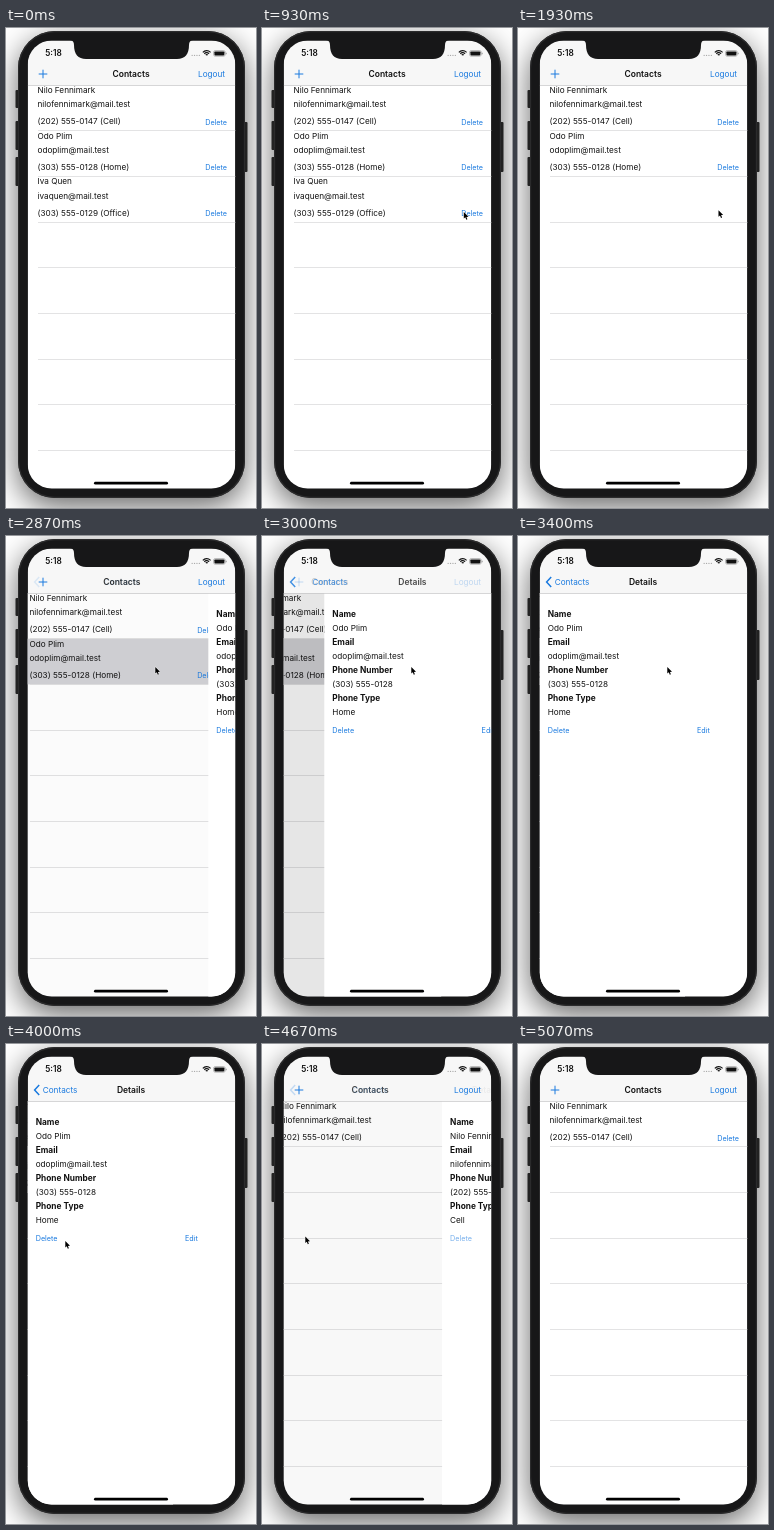
An HTML page with a canvas for the animation above (5.54 s loop, 250 by 480 pixels).

```html
<!DOCTYPE html>
<html lang="en">
<head>
<meta charset="utf-8">
<title>Contacts</title>
<style>
html, body { margin: 0; width: 100%; height: 100%; overflow: hidden; background: #fff; }
canvas { display: block; width: 250px; height: 480px; }
</style>
</head>
<body>
<canvas id="stage"></canvas>
<script>
const W = 250, H = 480, LOOP = 5540, TICK = 1000 / 15;
const BLUE = '#1a7adf', INK = '#111';
const SCREEN = { x: 21.7, y: 12.5, w: 207.6, h: 448, r: 24 };
const NAV_BOTTOM = 57, ROW = 45.7;
const canvas = document.getElementById('stage');
const ctx = canvas.getContext('2d');
const dpr = window.devicePixelRatio || 1;
canvas.width = W * dpr;
canvas.height = H * dpr;

const contacts = [
  { name: 'Nilo Fennimark', email: 'nilofennimark@mail.test', phone: '(202) 555-0147', type: 'Cell' },
  { name: 'Odo Plim', email: 'odoplim@mail.test', phone: '(303) 555-0128', type: 'Home' },
  { name: 'Iva Quen', email: 'ivaquen@mail.test', phone: '(303) 555-0129', type: 'Office' }
];

// Pointer path: tick, x, y
const pointerPath = [
  [7, 231, 182.5], [9, 208, 184], [11, 190.5, 185], [14, 201.5, 184], [18, 202, 184],
  [28, 202, 184], [37, 149, 131], [51, 149, 131], [60, 59, 197], [63, 43, 192.5], [76, 43, 192.5]
];

const clamp = v => Math.max(0, Math.min(1, v));
const smooth = v => v * v * (3 - 2 * v);

// Critically damped spring: share of the distance still to travel
function springLeft(ms) {
  if (ms <= 0) return 1;
  const k = ms * 0.018;
  return Math.exp(-k) * (1 + k);
}

function box(x, y, w, h, r, fill) {
  ctx.beginPath();
  ctx.roundRect(x, y, w, h, r);
  ctx.fillStyle = fill;
  ctx.fill();
}

function text(str, x, midY, { size = 8.2, weight = 400, color = INK, align = 'left', alpha = 1 } = {}) {
  if (alpha <= 0) return;
  ctx.globalAlpha = alpha;
  ctx.font = `${weight} ${size}px Inter, sans-serif`;
  ctx.textAlign = align;
  ctx.fillStyle = color;
  ctx.fillText(str, x, midY + 3);
  ctx.globalAlpha = 1;
}

function stroke(points, color, width) {
  ctx.beginPath();
  points.forEach(([x, y]) => ctx.lineTo(x, y));
  ctx.strokeStyle = color;
  ctx.lineWidth = width;
  ctx.stroke();
}

function drawPhone() {
  ctx.fillStyle = '#fff';
  ctx.fillRect(0, 0, W, H);
  ctx.save();
  ctx.shadowColor = 'rgba(0,0,0,.6)';
  ctx.shadowBlur = 30 * dpr;
  ctx.shadowOffsetY = 9 * dpr;
  box(12, 3, 227, 467, 37, '#222');
  ctx.restore();
  [[9.5, 62, 18], [9.5, 93, 29], [9.5, 129, 29], [238, 94, 50]]
    .forEach(([x, y, h]) => box(x, y, 3.5, h, 1, '#222'));
  box(12, 3, 227, 467, 37, '#2b2b2c');
  box(13.2, 4.2, 224.6, 464.6, 36, '#171718');
}

function drawList(count, highlight, offset, dim) {
  ctx.save();
  ctx.translate(offset, 0);
  ctx.fillStyle = '#fff';
  ctx.fillRect(SCREEN.x, NAV_BOTTOM, SCREEN.w, 410);
  if (highlight >= 0) {
    ctx.fillStyle = '#d1d1d5';
    ctx.fillRect(SCREEN.x, NAV_BOTTOM + ROW * highlight, SCREEN.w, ROW);
  }
  for (let i = 1; i <= 8; i++) {
    ctx.fillStyle = '#dcdcde';
    ctx.fillRect(32, Math.round(NAV_BOTTOM - 0.6 + ROW * i), 198, 0.8);
  }
  contacts.slice(0, count).forEach((c, i) => {
    const y = ROW * i;
    text(c.name, 31.5, y + 62);
    text(c.email, 31.5, y + 76.2);
    text(`${c.phone} (${c.type})`, 31.5, y + 93.4);
    text('Delete', 221, y + 93.6, { size: 7.2, color: BLUE, align: 'right' });
  });
  ctx.restore();
  ctx.fillStyle = `rgba(0,0,0,${dim})`;
  ctx.fillRect(SCREEN.x, NAV_BOTTOM, SCREEN.w, 410);
}

function drawDetails(c, offset, deleteAlpha) {
  ctx.save();
  ctx.translate(offset, 0);
  ctx.fillStyle = '#fff';
  ctx.fillRect(SCREEN.x, NAV_BOTTOM, SCREEN.w, 410);
  [['Name', c.name], ['Email', c.email], ['Phone Number', c.phone], ['Phone Type', c.type]]
    .forEach(([label, value], i) => {
      const y = 78 + i * 28.1;
      text(label, 29.7, y, { weight: 700, size: 8.3 });
      text(value, 29.7, y + 14);
    });
  text('Delete', 29.7, 193.5, { size: 7.2, color: BLUE, alpha: deleteAlpha });
  text('Edit', 179, 193.5, { size: 7.2, color: BLUE });
  ctx.restore();
}

// p: 1 = list in front, 0 = details in front
function drawNav(p) {
  ctx.fillStyle = '#f7f7f7';
  ctx.fillRect(SCREEN.x, SCREEN.y, SCREEN.w, NAV_BOTTOM - SCREEN.y);
  ctx.fillStyle = '#c4c4c6';
  ctx.fillRect(SCREEN.x, NAV_BOTTOM, SCREEN.w, 0.7);

  const buttons = clamp(p * 1.3);
  const mid = 54 + 71 * p;
  const title = { size: 8.5, weight: 600, align: 'center' };
  text('Contacts', mid, 46, { ...title, alpha: p });
  text('Contacts', mid, 46, { align: 'center', color: BLUE, alpha: 1 - p });
  text('Details', 125 + 130 * p, 46, { ...title, alpha: clamp(1 - p * 1.25) });
  text('Logout', 219, 46, { align: 'right', color: BLUE, alpha: buttons });

  ctx.globalAlpha = buttons;
  stroke([[32.7, 46], [41.3, 46]], BLUE, 1);
  stroke([[37, 41.7], [37, 50.3]], BLUE, 1);
  ctx.globalAlpha = 1 - p;
  stroke([[33.2, 41], [28.6, 46], [33.2, 51]], BLUE, 1.5);
  ctx.globalAlpha = 1;
}

function drawStatus() {
  text('5:18', 47.5, 25.2, { size: 8.3, weight: 600, align: 'center' });
  for (let i = 0; i < 4; i++) box(185.5 + i * 2.4, 26.8, 1.3, 1.3, 0.65, '#aaa');
  ctx.strokeStyle = INK;
  ctx.lineWidth = 1.2;
  [1.3, 3.3, 5.3].forEach(r => {
    ctx.beginPath();
    ctx.arc(200.7, 28, r, -Math.PI * 0.76, -Math.PI * 0.24);
    ctx.stroke();
  });
  ctx.beginPath();
  ctx.roundRect(207.6, 22.6, 11.6, 5.6, 1.6);
  ctx.strokeStyle = '#888';
  ctx.lineWidth = 0.6;
  ctx.stroke();
  box(208.4, 23.4, 10, 4, 0.8, INK);
  box(219.8, 24.5, 0.8, 1.8, 0.4, '#888');
}

function drawNotch() {
  ctx.beginPath();
  ctx.moveTo(64, 12);
  ctx.quadraticCurveTo(68, 12.5, 68, 17);
  ctx.bezierCurveTo(68, 26, 72, 31, 80, 31);
  ctx.lineTo(171, 31);
  ctx.bezierCurveTo(179, 31, 183, 26, 183, 17);
  ctx.quadraticCurveTo(183, 12.5, 187, 12);
  ctx.closePath();
  ctx.fillStyle = '#171718';
  ctx.fill();
}

function drawPointer(tick) {
  const next = pointerPath.findIndex(k => k[0] > tick);
  if (next < 1) return;
  const [t0, x0, y0] = pointerPath[next - 1];
  const [t1, x1, y1] = pointerPath[next];
  const e = smooth((tick - t0) / (t1 - t0));
  ctx.save();
  ctx.translate(x0 + (x1 - x0) * e + 0.3, y0 + (y1 - y0) * e);
  ctx.beginPath();
  [[0, 0], [0, 6.6], [1.5, 5.3], [2.5, 7.7], [3.6, 7.2], [2.6, 4.9], [4.7, 4.7]]
    .forEach(([x, y]) => ctx.lineTo(x, y));
  ctx.closePath();
  ctx.strokeStyle = '#fff';
  ctx.lineWidth = 0.9;
  ctx.stroke();
  ctx.fillStyle = '#000';
  ctx.fill();
  ctx.restore();
}

function render(ms) {
  const tick = Math.min(76, Math.floor((ms + 5) / TICK));
  const t = tick * TICK;
  const popping = tick >= 67;
  const p = tick >= 76 ? 1 : popping ? 1 - springLeft(t - 4513) : tick >= 51 ? 0 : springLeft(t - 2832);
  const count = popping ? 1 : tick >= 22 ? 2 : 3;
  const highlight = tick >= 43 && !popping ? 1 : -1;

  ctx.setTransform(dpr, 0, 0, dpr, 0, 0);
  drawPhone();
  ctx.save();
  ctx.beginPath();
  ctx.roundRect(SCREEN.x, SCREEN.y, SCREEN.w, SCREEN.h, SCREEN.r);
  ctx.clip();
  drawList(count, highlight, -0.3 * SCREEN.w * (1 - p), 0.12 * (1 - p));
  if (p < 0.999) drawDetails(contacts[popping ? 0 : 1], SCREEN.w * p, popping ? 0.6 : 1);
  drawNav(p);
  drawStatus();
  box(88, 453.8, 74, 2.8, 1.4, '#000');
  ctx.restore();
  drawNotch();
  drawPointer(tick);
}

const start = performance.now();
function loop() {
  render((performance.now() - start) % LOOP);
  requestAnimationFrame(loop);
}
loop();
</script>
</body>
</html>
```
